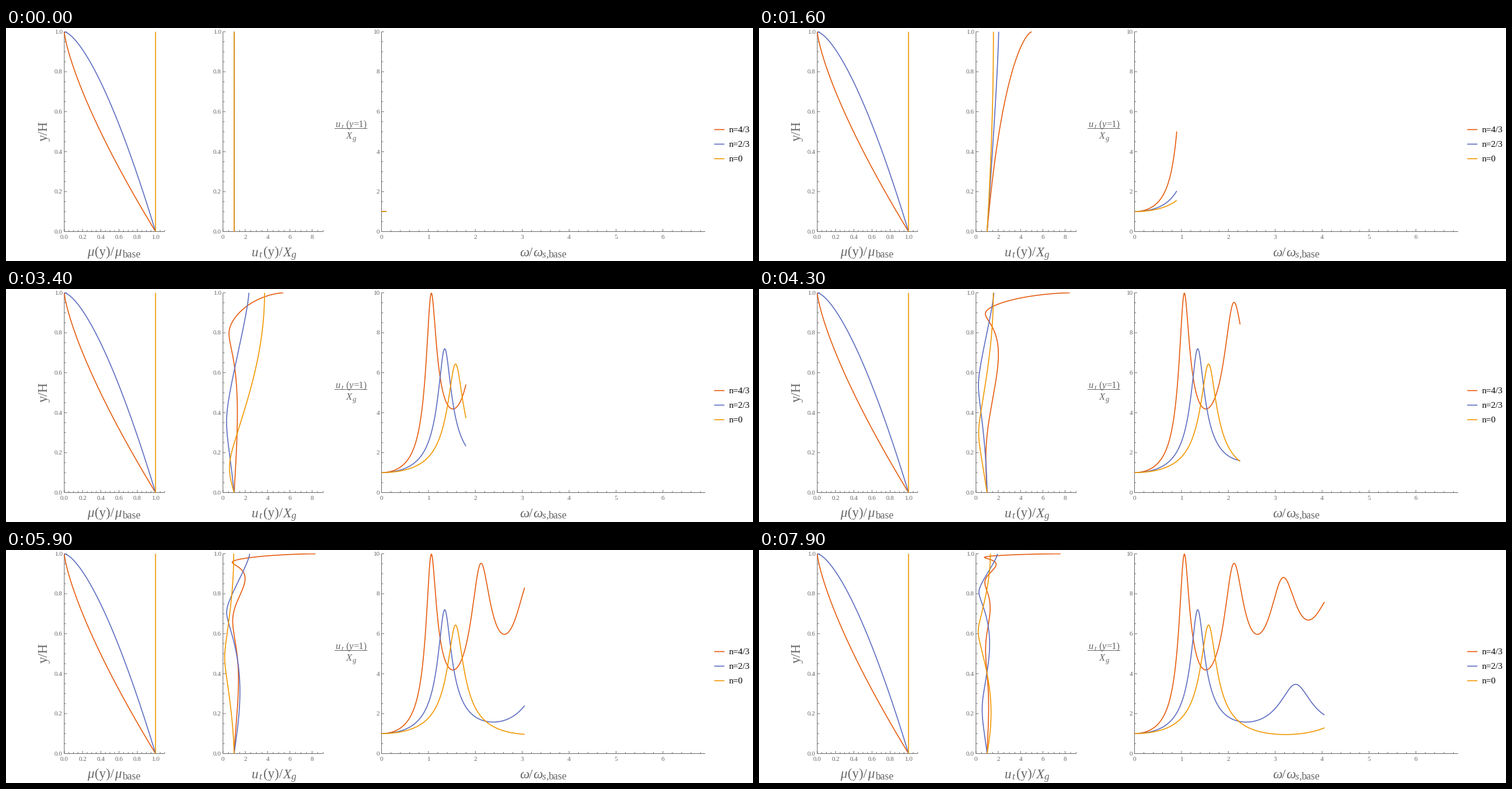
A matplotlib script for the animation above (8000 ms loop, 1280 px wide and 400 px high).

```python
import numpy as np
import matplotlib.pyplot as plt
from matplotlib.animation import FuncAnimation
from matplotlib.patches import Rectangle

W, H, DPI = 1280, 400, 100
FRAMES, INTERVAL = 80, 100
PT = 72 / DPI
GRAY = "#666666"
DAMPING = 0.1
TOP, BOTTOM = 6.5, 349.5

# exponent n of the stiffness profile (1 - y)^n, with its colour and label
CASES = [
    (4 / 3, (0.9, 0.36, 0.054), "n=4/3"),
    (2 / 3, (0.365, 0.428, 0.758), "n=2/3"),
    (0, (0.945, 0.594, 0.0), "n=0"),
]

plt.rcParams["font.family"] = "Liberation Serif"
fig = plt.figure(figsize=(W / DPI, H / DPI), dpi=DPI, facecolor="white")
ax = fig.add_axes([0, 0, 1, 1])
ax.set(xlim=(0, W), ylim=(H, 0))
ax.axis("off")


def text(x, y, s, size, color=GRAY, **kw):
    return ax.text(x, y, s, fontsize=size * PT, color=color, va="baseline", **kw)


def runs(*parts):
    """Each part: x, baseline, string, pixel size, italic flag."""
    for x, y, s, size, italic in parts:
        text(x, y, s, size, style="italic" if italic else "normal")


def stroke(xs, ys, color=GRAY, width=1.0, **kw):
    return ax.plot(xs, ys, color=color, lw=width * PT, snap=False,
                   solid_capstyle="butt", **kw)[0]


class Panel:
    def __init__(self, left, right, xmax, ymax):
        self.left, self.right = left, right
        self.xmax, self.ymax = xmax, ymax
        self.clip = Rectangle((left - 1, TOP - 1), right - left + 2,
                              BOTTOM - TOP + 2, transform=ax.transData)

    def px(self, x):
        return self.left + np.asarray(x) / self.xmax * (self.right - self.left)

    def py(self, y):
        return BOTTOM - np.asarray(y) / self.ymax * (BOTTOM - TOP)

    def axes(self, xstep, xsub, ystep, ysub, xfmt, yfmt):
        stroke([self.left, self.right], [BOTTOM, BOTTOM])
        stroke([self.left, self.left], [BOTTOM, TOP])
        for i in range(int(self.xmax / xstep * xsub + 1e-6) + 1):
            v, major = i * xstep / xsub, i % xsub == 0
            x = float(self.px(v))
            stroke([x, x], [BOTTOM, BOTTOM - (4.5 if major else 2.7)], width=0.9)
            if major:
                text(x, 362.3, format(v, xfmt), 11.3, ha="center")
        for i in range(int(self.ymax / ystep * ysub + 1e-6) + 1):
            v, major = i * ystep / ysub, i % ysub == 0
            y = float(self.py(v))
            stroke([self.left, self.left + (4.5 if major else 2.7)], [y, y], width=0.9)
            if major:
                text(self.left - 3.2, y + 3.3, format(v, yfmt), 11.3, ha="right")

    def curve(self, color):
        line = stroke([], [], color, 1.65, zorder=3)
        line.set_clip_path(self.clip)
        return line

    def put(self, line, x, y):
        line.set_data(self.px(x), self.py(y))


def shape(n, k, z):
    """Standing shear wave under a free surface, z measured down from the top."""
    b = 1 / (2 - n)
    arg = -(k * b) ** 2 * z ** (2 - n)
    term = total = np.ones_like(arg)
    for m in range(80):
        term = term * arg / ((m + 1) * (b + m))
        total = total + term
    return total


def wavenumber(omega):
    return omega / np.sqrt(1 + 2j * DAMPING)


stiffness = Panel(99.9, 271.9, 1.1, 1)
profile = Panel(371.8, 543.6, 9, 1)
response = Panel(643.5, 1198, 6.9, 10)
stiffness.axes(0.2, 4, 0.2, 4, ".1f", ".1f")
profile.axes(2, 4, 0.2, 4, ".0f", ".1f")
response.axes(1, 5, 2, 4, ".0f", ".0f")

# axis titles
text(70.5, 194.5, "y/H", 22.7, rotation=90, rotation_mode="anchor")
runs((139, 391.5, "μ", 23, True), (152, 391.5, "(y)/", 23, False),
     (186.5, 391.5, "μ", 23, True), (199.5, 394, "base", 17.8, False))
runs((420.5, 391.5, "u", 23, True), (433.5, 394, "t", 17, True),
     (440.5, 391.5, "(y)/", 23, False), (475, 391.5, "X", 23, True),
     (488.5, 394, "g", 17, True))
runs((880.5, 391.5, "ω", 23, True), (896.5, 391.5, "/", 23, False),
     (903, 391.5, "ω", 23, True), (918.5, 394, "s", 17, True),
     (925, 394, ",", 17, False), (929, 394, "base", 17.8, False))
runs((564.5, 170.5, "u", 16.5, True), (574, 173, "t", 12, True),
     (582, 170.5, "(", 16.5, False), (587.5, 170.5, "y", 16.5, True),
     (595, 170.5, "=1)", 16.5, False),
     (583, 190, "X", 16.5, True), (593.5, 192.5, "g", 12.5, True))
stroke([563, 619], [172.5, 172.5])

s = np.linspace(0, 1, 400)
depth = s ** 3
omegas = np.arange(0, 406) * 0.01
moving = []
for i, (n, color, name) in enumerate(CASES):
    stiffness.put(stiffness.curve(color), s ** n, 1 - s)
    gain = np.abs(1 / shape(n, wavenumber(omegas), np.ones_like(omegas)))
    moving.append((n, gain, profile.curve(color), response.curve(color)))
    y = 174.4 + 25 * i
    stroke([1213.5, 1231], [y, y], color, 1.65)
    text(1239, y + 4.2, name, 15.4, "black")


def update(frame):
    last = 10 + 5 * frame
    k = wavenumber(omegas[last])
    for n, gain, wave, trace in moving:
        u = np.abs(shape(n, k, depth) / shape(n, k, 1.0))
        profile.put(wave, u, 1 - depth)
        response.put(trace, omegas[:last + 1], gain[:last + 1])
    return [line for row in moving for line in row[2:]]


anim = FuncAnimation(fig, update, frames=FRAMES, interval=INTERVAL,
                     repeat=True, repeat_delay=0, blit=False)
plt.show()
```
